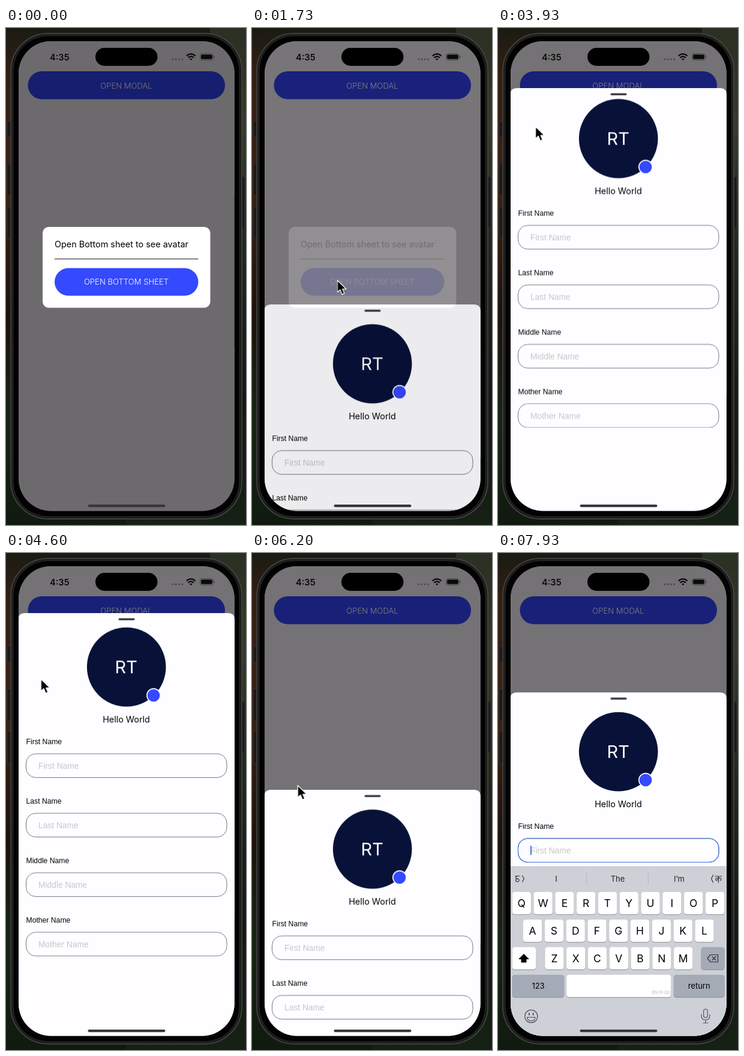
These frames come from a looping animation (400 by 827 pixels, 8000 ms). An HTML page:

```html
<!DOCTYPE html>
<html lang="en">
<head>
<meta charset="utf-8">
<title>Modal and bottom sheet</title>
<style>
html, body { margin: 0; width: 100%; height: 100%; overflow: hidden; background: #0c100c; }
svg { display: block; width: 100%; height: 100%; }
text { font-family: Inter, sans-serif; font-size: 14.4px; }
.mid { text-anchor: middle; }
.caps { font-size: 13.1px; font-weight: 300; fill: #fff; text-anchor: middle; }
.label { font: 12.2px "Liberation Sans", Arial, sans-serif; }
.hint { font: 13.8px "Liberation Sans", Arial, sans-serif; fill: #c6c6ca; }
.line { fill: none; stroke: #333; stroke-width: 1.2; stroke-linecap: round; stroke-linejoin: round; }

#backdrop, #modal, #sheet, #scroll, #focus, #keyboard, #cursor { animation: 8s linear infinite; }
#backdrop { animation-name: backdrop; }
#modal { animation-name: modal; }
#sheet { animation-name: sheet; }
#scroll { animation-name: scroll; }
#focus { animation-name: focus; }
#keyboard { animation-name: keyboard; }
#cursor { animation-name: cursor; }

@keyframes backdrop {
  0%, 18.6% { opacity: 0; animation-timing-function: cubic-bezier(.215,.61,.355,1); }
  24.2%, 100% { opacity: .5; }
}
@keyframes modal {
  0%, 18.4% { opacity: 1; }
  22.15%, 100% { opacity: 0; }
}
@keyframes sheet {
  0%, 18.8% { transform: translateY(804px); animation-timing-function: cubic-bezier(.215,.61,.355,1); }
  24.4% { transform: translateY(413px); }
  37.5% { transform: translateY(413px); animation-timing-function: ease-in; }
  40% { transform: translateY(352.5px); animation-timing-function: ease-out; }
  45% { transform: translateY(100px); }
  71% { transform: translateY(100px); animation-timing-function: cubic-bezier(.4,0,.7,.9); }
  77.5% { transform: translateY(394px); animation-timing-function: ease-out; }
  80% { transform: translateY(413px); }
  94.25% { transform: translateY(413px); animation-timing-function: cubic-bezier(.25,.5,.3,1); }
  98.8%, 100% { transform: translateY(232px); }
}
@keyframes scroll {
  0%, 46% { transform: none; animation-timing-function: ease-out; }
  51% { transform: translateY(-18px); animation-timing-function: ease-in-out; }
  57.5% { transform: translateY(-9px); animation-timing-function: ease-out; }
  60%, 100% { transform: none; }
}
@keyframes focus {
  0%, 87.5% { opacity: 0; }
  87.51%, 100% { opacity: 1; }
}
@keyframes keyboard {
  0%, 90.9% { transform: translateY(804px); animation-timing-function: cubic-bezier(.215,.61,.355,1); }
  96.5%, 100% { transform: translateY(521px); }
}
@keyframes cursor {
  0%, 8% { transform: translate(-30px,560px); animation-timing-function: ease-in-out; }
  16%, 26% { transform: translate(141.5px,419px); animation-timing-function: ease-in-out; }
  35% { transform: translate(73px,486px); }
  37.5% { transform: translate(73px,486px); animation-timing-function: ease-in; }
  40% { transform: translate(68px,425px); animation-timing-function: ease-out; }
  45% { transform: translate(66px,175px); }
  51% { transform: translate(60px,158px); animation-timing-function: ease-in-out; }
  57.5% { transform: translate(57.5px,209px); animation-timing-function: ease-in-out; }
  69% { transform: translate(76px,105px); }
  71% { transform: translate(76px,105px); animation-timing-function: cubic-bezier(.4,0,.7,.9); }
  77.5% { transform: translate(75.5px,386px); }
  79% { transform: translate(76px,392px); animation-timing-function: ease-in-out; }
  86% { transform: translate(100px,655px); }
  89% { transform: translate(100px,655px); animation-timing-function: ease-in-out; }
  93.5%, 95% { transform: translate(-14px,648px); }
  96%, 100% { transform: translate(-30px,648px); }
}
</style>
</head>
<body>
<svg viewBox="0 0 400 827" preserveAspectRatio="none">
  <defs>
    <linearGradient id="bark" x2="0" y2="1">
      <stop offset="0" stop-color="#1a1b12"/><stop offset=".1" stop-color="#351f13"/>
      <stop offset=".35" stop-color="#3a2012"/><stop offset=".58" stop-color="#1c120b"/>
      <stop offset=".78" stop-color="#172513"/><stop offset="1" stop-color="#101a0f"/>
    </linearGradient>
    <linearGradient id="leaves" x2="0" y2="1">
      <stop offset="0" stop-color="#2a3022"/><stop offset=".2" stop-color="#353a2a"/>
      <stop offset=".45" stop-color="#21281c"/><stop offset=".75" stop-color="#141a12"/>
      <stop offset="1" stop-color="#152114"/>
    </linearGradient>
    <clipPath id="screen"><rect x="21" y="22" width="359.8" height="781.5" rx="54"/></clipPath>
  </defs>

  <rect width="200" height="827" fill="url(#bark)"/>
  <rect x="200" width="200" height="827" fill="url(#leaves)"/>
  <rect x="60" width="280" height="9" fill="#171c14"/>
  <g fill="#1b1a1a" stroke="#3a3939" stroke-width=".8">
    <rect x="2" y="155" width="8" height="27" rx="2"/>
    <rect x="2" y="226" width="8" height="53" rx="2"/>
    <rect x="2" y="297" width="8" height="53" rx="2"/>
    <rect x="390" y="247" width="8" height="86" rx="2"/>
  </g>
  <rect x="8" y="9" width="385" height="808" rx="62" fill="#1c1c1d" stroke="#4b4a4b" stroke-width="1.4"/>
  <rect x="12" y="13" width="377" height="800" rx="58" fill="#020202" stroke="#303030" stroke-width=".8"/>

  <g clip-path="url(#screen)">
    <rect width="400" height="827" fill="#eae5ea"/>
    <rect x="36.5" y="72" width="328.5" height="46.5" rx="23.2" fill="#3142f0"/>
    <text class="caps" x="200.5" y="100.7">OPEN MODAL</text>
    <rect id="backdrop" width="400" height="827"/>

    <g id="sheet">
      <path d="M20.500 800V11Q20.500 0 31.500 0H370Q381 0 381 11V800Z" fill="#fefdff"/>
      <rect x="187.5" y="8.500" width="27" height="3.6" rx="1.8" fill="#434145"/>
      <g id="scroll">
        <circle cx="200.7" cy="98.6" r="65.8" fill="#081238"/>
        <text class="mid" x="200.2" y="109" style="font-size:29px" fill="#fff">RT</text>
        <circle cx="246" cy="145.8" r="11.2" fill="#3549ff" stroke="#fff" stroke-width="1.6"/>
        <text class="mid" x="200.5" y="190.8">Hello World</text>
        <g id="fields"></g>
        <g id="focus">
          <rect x="33.5" y="243" width="334.5" height="39.5" rx="16" fill="none" stroke="#3f6fe6" stroke-width="1.2"/>
          <rect x="54" y="255" width="1.8" height="15.5" fill="#3f6fe6"/>
        </g>
      </g>
    </g>

    <g id="keyboard">
      <rect x="20" width="362" height="300" fill="#cdd0d7"/>
      <path d="M147.8 11V31M250.3 11V31" stroke="#b4b7be"/>
      <g id="words" fill="#222"></g>
      <g class="line">
        <path d="M29 16.500H36M33 16.500Q29 17 30 20Q31 21 33.500 21Q29 21 29.500 24Q31 27 34 25.500Q36.500 23 33.500 21M40.500 16L43.500 21L40.500 26"/>
        <path d="M358.500 15L355.500 21L358.500 27M362 17H373M367.500 17V27M367.500 20Q362 19 363 23Q365 25 367.500 21Q371 18 372 22L371 24"/>
      </g>
      <g id="keys"></g>
      <path d="M43 146.500L51 154.500H47V160H39V154.500H35Z" stroke="#000" stroke-linejoin="round"/>
      <path class="line" d="M349 153.500L354 147.500H366.500V159.500H354ZM357 150.500L363 156.500M363 150.500L357 156.500"/>
      <text x="256.5" y="212.5" style="font-size:7px" fill="#b9bac0">EN HI QU</text>
      <g class="line" style="stroke:#505359">
        <circle cx="55.3" cy="250" r="10.6"/>
        <path d="M48.500 251.500H62Q61.500 257.500 55.300 257.500Q49 257.500 48.500 251.500Z"/>
        <path d="M52 245V247.500M58.600 245V247.500" stroke-width="2"/>
        <rect x="342.7" y="238" width="6.6" height="14" rx="3.3"/>
        <path d="M339 247V249.500Q339.500 256 346 256Q352.500 256 353 249.500V247M346 256V261M342 261H350"/>
      </g>
    </g>

    <g id="modal">
      <rect width="400" height="827" opacity=".537"/>
      <rect x="61" y="331" width="279.5" height="134.5" rx="10" fill="#fff"/>
      <text x="81" y="365.3">Open Bottom sheet to see avatar</text>
      <path d="M81 384.200H320.500" stroke="#111" stroke-width="1.1"/>
      <rect x="81" y="399.5" width="239.5" height="46" rx="23" fill="#3549ff"/>
      <text class="caps" x="200.5" y="427.3">OPEN BOTTOM SHEET</text>
    </g>

    <text x="73" y="53.5" style="font-size:14.6px;font-weight:600" fill="#0a0a0a">4:35</text>
    <rect x="149" y="33" width="103.5" height="30" rx="15"/>
    <path d="M278 52H294" stroke="#4a484a" stroke-width="3" stroke-linecap="round" stroke-dasharray="0 5.2"/>
    <g fill="none" stroke="#0a0a0a" stroke-width="2.2">
      <path d="M300.800 46.500Q308.200 39.700 315.600 46.500M303.500 49.500Q308.200 45.300 312.900 49.500"/>
      <path d="M308.200 53.800L305.900 51.700Q308.200 49.800 310.500 51.700Z" fill="#0a0a0a" stroke="none"/>
    </g>
    <rect x="323.5" y="42.7" width="21.8" height="10.6" rx="3.3" fill="none" stroke="#444"/>
    <rect x="325" y="44.2" width="18.8" height="7.6" rx="2" fill="#0a0a0a"/>
    <path d="M347 46.200V49.800" stroke="#444" stroke-width="1.3"/>
    <rect x="136.5" y="793" width="129" height="4.2" rx="2.1" fill="#38363a"/>
  </g>

  <g id="cursor">
    <path d="M.7 .7V20.700L5.400 16.600L8.600 24.400L12.300 22.800L9.200 15.300H15.400Z" stroke="#fff" stroke-width="1.3" stroke-linejoin="round"/>
  </g>
</svg>
<script>
const byId = id => document.getElementById(id);

byId('fields').innerHTML = ['First', 'Last', 'Middle', 'Mother'].map((word, i) => {
  const y = i * 99;
  return `<text class="label" x="33.5" y="${y + 227.3}">${word} Name</text>
    <rect x="33.5" y="${y + 243}" width="334.5" height="39.5" rx="16" fill="none" stroke="#77757a"/>
    <text class="hint" x="54" y="${y + 267.8}">${word} Name</text>`;
}).join('');

byId('words').innerHTML = [['I', 97], ['The', 199.5], ['I’m', 302]]
  .map(([word, x]) => `<text class="mid" x="${x}" y="25.5" style="font-size:13px">${word}</text>`).join('');

const key = (x, y, w, text = '', size = 17.5, fill = '#fff') =>
  `<rect x="${x}" y="${y + 1}" width="${w}" height="37.2" rx="4.3" fill="#8b8e95"/>
   <rect x="${x}" y="${y}" width="${w}" height="37.2" rx="4.3" fill="${fill}"/>
   <text class="mid" x="${x + w / 2}" y="${y + 18.6 + size * .364}" style="font-size:${size}px">${text}</text>`;
const row = (letters, x, y) => [...letters].map((c, i) => key(x + i * 35.8, y, 31.2, c)).join('');
const grey = '#a4aab6';

byId('keys').innerHTML = row('QWERTYUIOP', 23.7, 43) + row('ASDFGHJKL', 42, 89) + row('ZXCVBNM', 78.3, 134.7)
  + key(23.7, 134.7, 39.5) + key(338.5, 134.7, 39, '', 13, grey)
  + key(23.7, 180.7, 86.6, '123', 13, grey) + key(114.2, 180.7, 174.3) + key(292.8, 180.7, 84.7, 'return', 13, grey);
</script>
</body>
</html>
```
